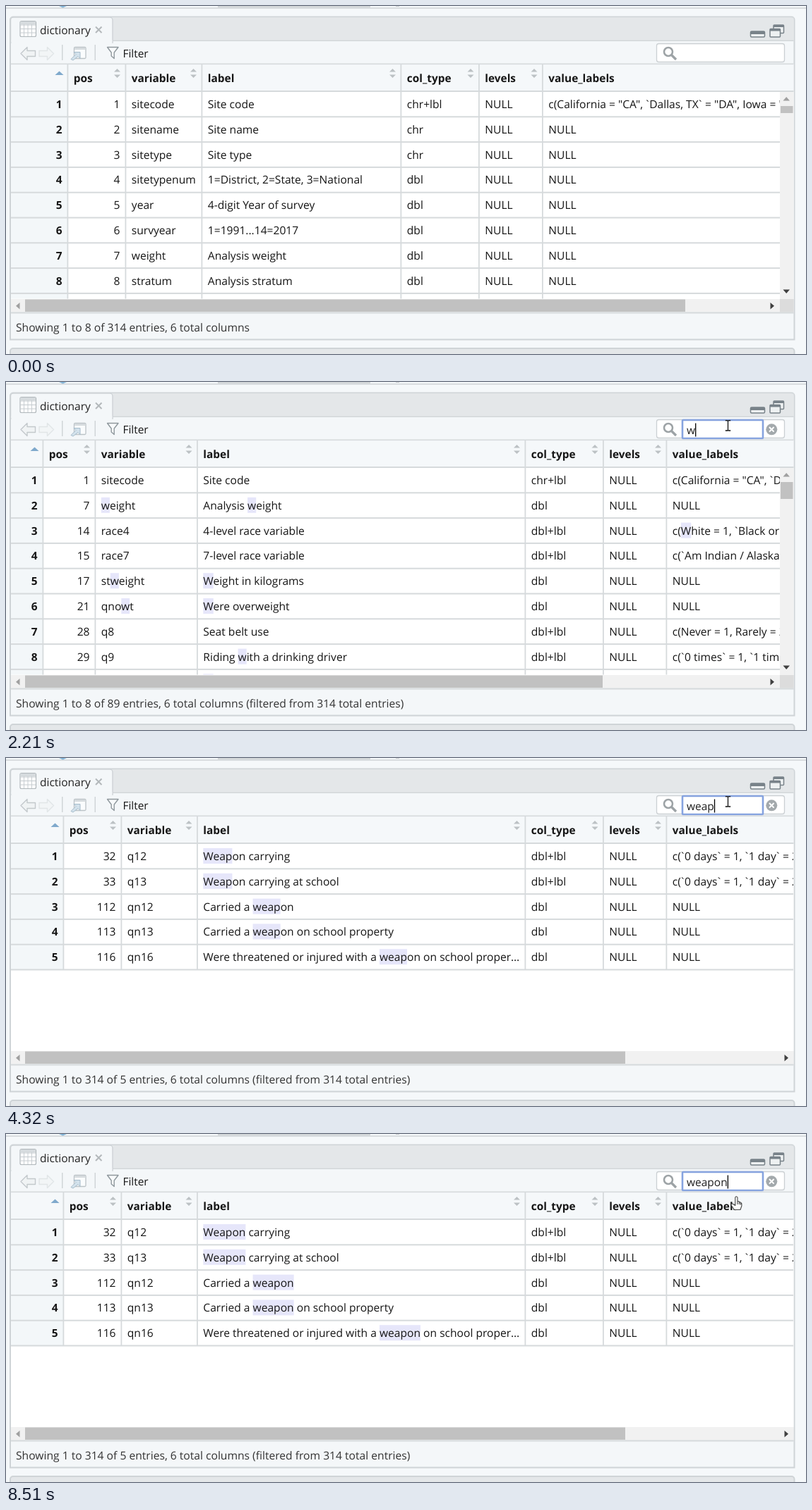
Recreate the animation shown at these times as an HTML page with a canvas. Size 1133 by 494 pixels, loop 8580 ms.

```html
<!DOCTYPE html>
<html lang="en">
<head>
<meta charset="utf-8">
<title>Data viewer search</title>
<style>
html, body { margin: 0; width: 100%; height: 100%; overflow: hidden; background: #f5f8fa; }
canvas { display: block; }
</style>
</head>
<body>
<canvas id="stage" width="1133" height="494"></canvas>
<script>
const ctx = document.getElementById('stage').getContext('2d');
const LOOP = 8580, CLICK = 950, BLINK = 540, ROW = 35.8, TOP = 121.5;
const FACE = '"Open Sans", "Noto Sans", sans-serif';
const TICK_FACE = '"Liberation Sans", sans-serif'; // has a narrow backtick
const LINE = '#d6dadc', PANEL = '#f4f7f9', STRIP = '#e4e7e9';

// Rows: pos, variable, label, type, value labels
const q12 = [32, 'q12', 'Weapon carrying', 'dbl+lbl', 'c(`0 days` = 1, `1 day` = 2'];
const q13 = [33, 'q13', 'Weapon carrying at school', 'dbl+lbl', 'c(`0 days` = 1, `1 day` = 2'];
const site = [1, 'sitecode', 'Site code', 'chr+lbl', 'c(California = "CA", `Dallas, TX` = "DA", Iowa = "IA"'];
const weight = [7, 'weight', 'Analysis weight', 'dbl'];
const stweight = [17, 'stweight', 'Weight in kilograms', 'dbl'];
const qnowt = [21, 'qnowt', 'Were overweight', 'dbl'];
const weapons = [q12, q13,
  [112, 'qn12', 'Carried a weapon', 'dbl'],
  [113, 'qn13', 'Carried a weapon on school property', 'dbl'],
  [116, 'qn16', 'Were threatened or injured with a weapon on school proper…', 'dbl']];
const wide = [271, 735.5, 846, 935.5];
const filtered = ' (filtered from 314 total entries)';
const status = (last, count) => `Showing 1 to ${last} of ${count} entries, 6 total columns`;

const full = {
  cols: [87.5, 169.5, 277.5, 559.5, 670, 760], thumb: 10, right: 962,
  status: status(8, 314),
  rows: [site,
    [2, 'sitename', 'Site name', 'chr'],
    [3, 'sitetype', 'Site type', 'chr'],
    [4, 'sitetypenum', '1=District, 2=State, 3=National', 'dbl'],
    [5, 'year', '4-digit Year of survey', 'dbl'],
    [6, 'survyear', '1=1991...14=2017', 'dbl'],
    weight,
    [8, 'stratum', 'Analysis stratum', 'dbl'],
    [9, 'psu', 'Analysis primary unit', 'dbl']]
};
const byW = {
  cols: [52.5, 126.5, ...wide], thumb: 24, right: 845,
  status: status(8, 89) + filtered,
  rows: [site, weight,
    [14, 'race4', '4-level race variable', 'dbl+lbl', 'c(White = 1, `Black or African'],
    [15, 'race7', '7-level race variable', 'dbl+lbl', 'c(`Am Indian / Alaska Native'],
    stweight, qnowt,
    [28, 'q8', 'Seat belt use', 'dbl+lbl', 'c(Never = 1, Rarely = 2'],
    [29, 'q9', 'Riding with a drinking driver', 'dbl+lbl', 'c(`0 times` = 1, `1 time` = 2'],
    q12]
};
const byWe = {
  cols: [62, 138.5, ...wide], thumb: 58, right: 845,
  status: status(8, 34) + filtered,
  rows: [site, weight, stweight, qnowt, q12, q13,
    [56, 'q36', 'EVP from store', 'dbl+lbl', 'c(`Did not use any vapor'],
    [86, 'q68', 'Perception of weight', 'dbl+lbl', 'c(`Very underweight` = 1'],
    [87, 'q69', 'Weight loss', 'dbl+lbl', 'c(`Lose weight` = 1']]
};
const byWeapon = {
  cols: [81.5, 163.5, ...wide], thumb: 0, right: 877,
  status: status(314, 5) + filtered, rows: weapons
};
const byWea = {
  ...byWeapon, status: status(314, 6) + filtered,
  rows: [...weapons, [194, 'qn94', 'Did not always wear a helmet', 'dbl']]
};

const keys = [
  { typed: 1730, applied: 2050, text: 'w', table: byW },
  { typed: 2520, applied: 2820, text: 'we', table: byWe },
  { typed: 3230, applied: 3550, text: 'wea', table: byWea },
  { typed: 4010, applied: 4320, text: 'weap', table: byWeapon },
  { typed: 4960, applied: 5280, text: 'weapo', table: byWeapon },
  { typed: 6030, applied: 6350, text: 'weapon', table: byWeapon }
];

function rect(x, y, w, h, fill) {
  ctx.fillStyle = fill;
  ctx.fillRect(x, y, w, h);
}
function paint(fill, stroke, lw = 1) {
  if (fill) { ctx.fillStyle = fill; ctx.fill(); }
  if (stroke) { ctx.strokeStyle = stroke; ctx.lineWidth = lw; ctx.stroke(); }
}
function box(x, y, w, h, r, fill, stroke, lw) {
  ctx.beginPath();
  ctx.roundRect(x, y, w, h, r);
  paint(fill, stroke, lw);
}
function disc(x, y, r, fill, stroke, lw) {
  ctx.beginPath();
  ctx.arc(x, y, r, 0, 7);
  paint(fill, stroke, lw);
}
function shape(d, fill, stroke, lw, x = 0, y = 0) {
  const p = new Path2D(d);
  ctx.save();
  ctx.translate(x, y);
  ctx.lineJoin = 'round';
  if (fill) { ctx.fillStyle = fill; ctx.fill(p); }
  if (stroke) { ctx.strokeStyle = stroke; ctx.lineWidth = lw; ctx.stroke(p); }
  ctx.restore();
}
function text(s, x, y, { size = 15.6, bold = false, color = '#161616', align = 'left' } = {}) {
  ctx.font = `${bold ? 'bold ' : ''}${size}px ${FACE}`;
  ctx.textAlign = align;
  ctx.fillStyle = color;
  ctx.fillText(s, x, y);
}
function clipped(x, y, w, h, draw) {
  ctx.save();
  ctx.beginPath();
  ctx.rect(x, y, w, h);
  ctx.clip();
  draw();
  ctx.restore();
}

function drawFrame() {
  rect(0, 0, 1133, 494, '#f5f8fa');
  rect(0, 2, 1133, 2, '#d9dde0');
  rect(300, 0, 216, 2, '#d3d7d9');
  shape('M75 0H86L80.5 2.5Z', '#84b5d8');
  rect(552, 0, 5, 1, '#c9cdd0');

  box(6, 15.5, 1110.5, 458, [4, 4, 0, 0], PANEL, '#cfd4d7', 2);
  rect(7, 16.5, 1108.5, 33, STRIP);
  rect(7, 48.5, 1108.5, 1.5, '#d3d7da');
  box(6.5, 16, 144.5, 36, [4, 4, 0, 0], PANEL, '#cfd4d7', 1.5);
  rect(7.5, 48, 142.7, 6, PANEL);
  box(6, 486, 1110.5, 20, [4, 4, 0, 0], STRIP, '#cfd4d7', 2);

  box(20, 21.5, 22.5, 22, 2, '#fff', '#b0b7bb', 1.2);
  rect(20.5, 22, 21.5, 4.5, '#d6dbde');
  shape('M20 27H42M20 32.5H42M20 38H42M25.5 26V43M31 26V43M36.5 26V43', null, '#c6ccd0', 1);
  text('dictionary', 48, 40, { size: 15.5, color: '#222' });
  shape('M127 29.5L135.5 38M135.5 29.5L127 38', null, '#b3b8bb', 2);

  box(1054.5, 36, 20, 8, 1.5, '#eef1f2', '#788289', 1.5);
  rect(1054.5, 36, 20, 4, '#788289');
  for (const [x, y] of [[1087, 27], [1082, 32.5]]) {
    box(x, y, 14.5, 11.5, 1, '#eef1f2', '#788289', 1.5);
    rect(x, y, 14.5, 3, '#788289');
  }

  const arrow = 'M0 9L9 0V5H20.5V13H9V18Z';
  shape(arrow, '#f0f3f4', '#c3c9cc', 1.4, 21, 58.5);
  ctx.save();
  ctx.scale(-1, 1);
  shape(arrow, '#f2f5f6', '#e1e5e7', 1.4, -67.5, 58.5);
  ctx.restore();
  rect(79, 55, 1.5, 22, '#d0d5d8');
  rect(125.5, 55, 1.5, 22, '#d0d5d8');
  box(96.5, 58.5, 16.5, 16, 1.5, '#fafcfd', '#bcc3c7', 1.3);
  rect(97, 59, 15.5, 3, '#d6dbde');
  shape('M92 75.5L99 68.5L96 65.5H105V74.5L102 71.5L95 77Z', '#d3e2ec', '#a6bccb', 1);
  shape('M143.5 58.5H159L153.2 66V74.5L149.2 71V66Z', '#f8fafb', '#8f989d', 1.4);
  text('Filter', 165.5, 73, { size: 15.4 });
}

function drawSearch(t, typed) {
  box(921.5, 53.5, 181, 26, 3, '#fff', '#cbd0d3', 1.3);
  disc(938, 65, 6, null, '#9da3a6', 2.6);
  shape('M942.5 69.5L949 76', null, '#9da3a6', 3.4);
  if (t < CLICK) return;
  box(958, 54, 114, 26, 1, '#fff', '#86a3df', 2.6);
  const value = typed ? typed.text : '';
  text(value, 964, 73.5, { size: 15.5, color: '#222' });
  const caretX = 964 + ctx.measureText(value).width;
  if (typed) {
    disc(1084.3, 67.3, 8, '#a3a9ac');
    shape('M1081 64L1087.6 70.6M1087.6 64L1081 70.6', null, '#fff', 2);
  }
  const since = t - (typed ? typed.typed : CLICK);
  if (since % (2 * BLINK) < BLINK) rect(caretX, 58.5, 1.3, 19, '#000');
}

// Writes a string run by run and returns the x where it ends.
function writeRuns(s, x, y, visible = true) {
  ctx.textAlign = 'left';
  ctx.fillStyle = '#161616';
  for (const run of s.split(/(`)/)) {
    ctx.font = `15.6px ${run === '`' ? TICK_FACE : FACE}`;
    if (visible) ctx.fillText(run, x, y);
    x += ctx.measureText(run).width;
  }
  return x;
}

function cellText(s, x, y, query) {
  const at = query ? s.toLowerCase().indexOf(query) : -1;
  if (at >= 0) {
    const start = writeRuns(s.slice(0, at), x, y, false);
    const end = writeRuns(s.slice(0, at + query.length), x, y, false);
    rect(start, y - 17, end - start, 22, '#e6e6fa');
  }
  writeRuns(s, x, y);
}

function drawTable({ cols, rows, thumb, right }, query) {
  const edge = thumb ? 1096 : 1115;
  rect(7, 82, 1108.5, 39, '#f5f8fa');
  rect(7, 121, 1108.5, 295, '#fff');
  const bottom = Math.min(415.5, TOP + rows.length * ROW);
  rect(7, TOP, cols[0] - 7, bottom - TOP, '#f3f7f9');

  clipped(7, TOP, edge - 7, 415.5 - TOP, () => rows.forEach((row, i) => {
    const [pos, variable, label, type, values = 'NULL'] = row;
    const y = 145 + i * ROW;
    text(i + 1, cols[0] - 8, y, { bold: true, size: 15.4, align: 'right' });
    text(pos, cols[1] - 8, y, { align: 'right' });
    [variable, label, type, 'NULL', values].forEach((s, c) =>
      cellText(s, cols[c + 1] + 8.3, y, query));
    rect(7, TOP - 1 + (i + 1) * ROW, edge - 7, 2, LINE);
  }));

  rect(7, 81.5, 1108.5, 1.6, LINE);
  rect(7, 120, 1108.5, 2, LINE);
  cols.forEach(x => rect(x - 1, 82, 1.8, bottom - 82, LINE));
  ['pos', 'variable', 'label', 'col_type', 'levels', 'value_labels'].forEach((name, i) => {
    text(name, cols[i] + 8.3, 108, { bold: true, size: 15.4 });
    if (i < 5) shape('M-4.5 93.5H4.5L0 89ZM-4.5 97.5H4.5L0 102Z', '#bcc1c4', null, 0, cols[i + 1] - 12);
  });
  shape('M-6 98H6L0 92.5Z', '#7fa9cc', null, 0, cols[0] - 12);

  rect(7, 416, 1108.5, 18.5, '#f1f1f1');
  rect(27, 416.5, right - 27, 17.5, '#c1c1c1');
  shape('M19.5 421V430.5L14 425.7Z', '#a0a0a0');
  shape('M0 421V430.5L5.5 425.7Z', '#404040', null, 0, thumb ? 1082.5 : 1102.5);
  if (thumb) {
    rect(1096, 122, 19.5, 294, '#f1f1f1');
    rect(1097, 142, 17.5, thumb, '#c1c1c1');
    shape('M1100.5 134.5H1110L1105.2 129Z', '#a0a0a0');
    shape('M1100.5 402.5H1110L1105.2 408Z', '#404040');
    rect(1096, 416, 19.5, 18.5, '#dcdcdc');
  }
  rect(7, 434.5, 1108.5, 2, LINE);
}

// Pointer track: time, x, y
const track = [[70, 1078, 370], [310, 1058, 190], [630, 1034, 18], [870, 1022.5, 62]];
function pointerAt(t) {
  if (t < 70) return null;
  if (t >= 8510) return [1034.5, 89];
  const step = 70 + Math.floor((t - 70) / 80) * 80;
  const i = track.findIndex(p => p[0] > step);
  if (i < 0) return track[3].slice(1);
  const [a, b] = [track[i - 1], track[i]];
  const k = (step - a[0]) / (b[0] - a[0]);
  return [a[1] + (b[1] - a[1]) * k, a[2] + (b[2] - a[2]) * k];
}

function drawPointer(t) {
  const p = pointerAt(t);
  if (!p) return;
  const [x, y] = p;
  if (y > 52 && y < 81)
    shape('M-3.7 -7.3H-1.3Q0 -7.3 0 -6Q0 -7.3 1.3 -7.3H3.7M0 -6.5V6M-3.7 7H-1.3Q0 7 0 5.7Q0 7 1.3 7H3.7', null, '#111', 1.3, x, y);
  else if (y > 82 && y < 121)
    shape('M-1.7 1Q0 -1.5 1.5 1V7Q3.2 5.7 4 8Q5.6 7 6 9Q7.5 8.4 7.4 10.5V13L5.5 18.5H-3L-7.5 12Q-7.5 9.5 -5 10.2L-1.7 12.5ZM1.5 7V11M4 8V11M6 9V11.5', '#fff', '#444', 1.1, x, y);
  else
    shape('M0 0V17.5L4.1 13.7L6.8 20L9.6 18.8L6.9 12.6H12.5Z', '#fff', '#111', 1.1, x, y);
}

function draw(t) {
  const typed = keys.findLast(k => t >= k.typed);
  const applied = keys.findLast(k => t >= k.applied);
  const table = applied ? applied.table : full;
  const recount = t >= 5280 && t < 5360;
  drawFrame();
  drawSearch(t, typed);
  drawTable(table, applied && applied.text);
  text(recount ? status(5, 5) + filtered : table.status, 14, 462, { size: 15.65, color: '#333' });
  drawPointer(t);
}

ctx.textRendering = 'geometricPrecision';
function tick() {
  draw(performance.now() % LOOP);
  requestAnimationFrame(tick);
}
tick();
</script>
</body>
</html>
```
